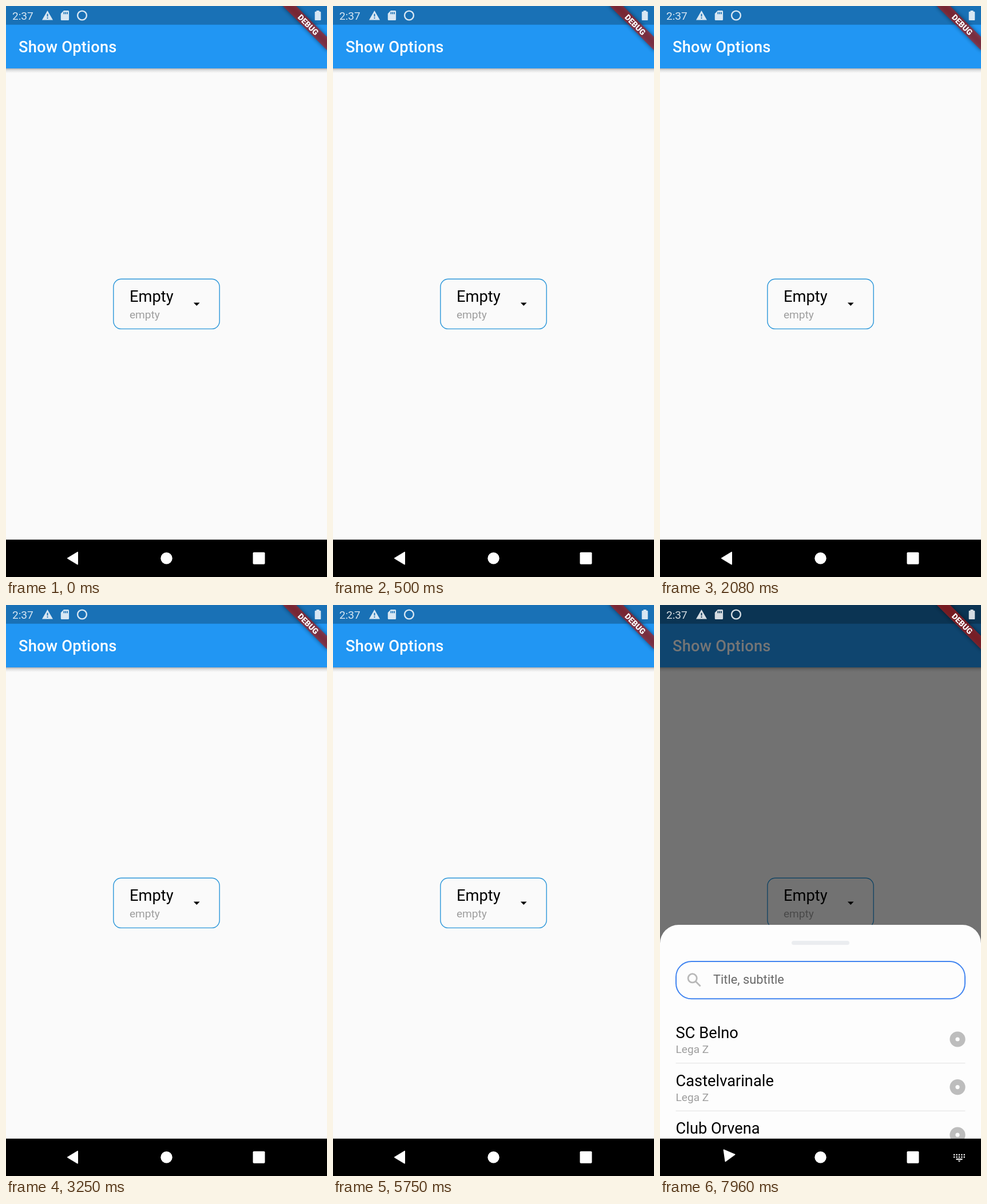
These frames come from a looping animation (561 by 998 pixels, 8 s). An HTML page:

```html
<!DOCTYPE html>
<html lang="en">
<head>
<meta charset="utf-8">
<title>Show Options</title>
<style>
  html, body { margin: 0; width: 100%; height: 100%; overflow: hidden; background: #000; }
  svg { display: block; width: 100vw; height: 100vh; font-family: Roboto, sans-serif; }
  .title { font-size: 27.28px; }
  .note { font-size: 19.1px; fill: #9e9e9e; }
</style>
</head>
<body>
<svg viewBox="0 0 561 998">
  <defs>
    <filter id="soft" x="-20%" y="-50%" width="140%" height="200%"><feGaussianBlur stdDeviation="3.5"/></filter>
    <linearGradient id="barShadow" x2="0" y2="1">
      <stop offset="0" stop-opacity=".3"/>
      <stop offset=".35" stop-opacity=".12"/>
      <stop offset="1" stop-opacity="0"/>
    </linearGradient>
  </defs>

  <!-- Page -->
  <rect width="561" height="933" fill="#fafafa"/>
  <rect y="109" width="561" height="8" fill="url(#barShadow)"/>
  <rect width="561" height="109" fill="#2196f3"/>
  <text class="title" x="22" y="81" font-weight="500" letter-spacing=".2" fill="#fff">Show Options</text>
  <rect x="187.8" y="477.2" width="185.4" height="87.2" rx="13.6" fill="none" stroke="#2b96d9" stroke-width="1.4"/>
  <text class="title" x="216" y="517">Empty</text>
  <text class="note" x="216" y="546">empty</text>
  <path d="M327.8 518.6h10.8l-5.4 5.4z"/>

  <rect id="barrier" width="561" height="933" opacity="0"/>

  <!-- Bottom sheet -->
  <g id="sheet" visibility="hidden">
    <path d="M0 933V591.5a32.5 32.5 0 0 1 32.5-32.5h496a32.5 32.5 0 0 1 32.5 32.5V933z" fill="#fdfdfd"/>
    <rect x="230" y="587" width="101" height="7" rx="3.5" fill="#ebedf0"/>
    <rect x="28" y="623" width="505" height="65.3" rx="27" fill="none" stroke="#4285f0" stroke-width="2"/>
    <g fill="none" stroke="#b8b8b8" stroke-width="2.8">
      <circle cx="56.7" cy="652.3" r="7.6"/>
      <path d="M62.2 657.8L70.6 666.2"/>
    </g>
    <text x="93" y="662" font-size="21.8" fill="#686868">Title, subtitle</text>
    <g id="rows"></g>
  </g>

  <!-- Status bar -->
  <rect width="561" height="32.7" opacity=".25"/>
  <g fill="#fff" fill-opacity=".83" fill-rule="evenodd">
    <text x="11" y="23.5" font-size="19.1">2:37</text>
    <path d="M72.5 8L82 24.5H63zM71.6 13.8h1.9v4.6h-1.9zM71.6 20h1.9v1.9h-1.9z"/>
    <path d="M101 8h7.6a1.5 1.5 0 0 1 1.5 1.5v13.9a1.5 1.5 0 0 1-1.5 1.5H97.300a1.500 1.500 0 0 1-1.500-1.500V13.300zM100.500 10.600h1.700v3.700h-1.700zM103.400 10.600h1.700v3.700h-1.700zM106.300 10.600h1.700v3.700h-1.700z"/>
    <circle cx="133" cy="16.500" r="7.900" fill="none" stroke="#fff" stroke-opacity=".83" stroke-width="2.400"/>
    <path d="M542.500 8h5v1.700h1.600a1.200 1.200 0 0 1 1.200 1.200v13a1.200 1.200 0 0 1-1.200 1.200h-8.200a1.200 1.200 0 0 1-1.200-1.200v-13a1.200 1.200 0 0 1 1.200-1.200h1.600z"/>
  </g>

  <!-- Corner ribbon -->
  <g transform="translate(561 0) rotate(45)">
    <rect x="-56" y="38.2" width="112" height="16.4" opacity=".5" filter="url(#soft)"/>
    <rect x="-56" y="38.2" width="112" height="16.4" fill="#b71c1c" fill-opacity=".627"/>
    <text y="51.300" font-size="13.9" font-weight="900" text-anchor="middle" fill="#fff">DEBUG</text>
  </g>

  <!-- Navigation bar -->
  <rect y="932.7" width="561" height="66"/>
  <g fill="#fff">
    <path id="back" d="M-10.700 0L6.700-10.500V10.500z" stroke="#fff" stroke-width="1.600" stroke-linejoin="round"/>
    <circle cx="280.5" cy="965.3" r="10.2"/>
    <rect x="431.5" y="954.8" width="21" height="21" rx="1.8"/>
    <path id="keyboard" visibility="hidden" d="M517.500 967.500h11v2.200h-11zM520.500 971h5l-2.500 2.200z"/>
    <path id="keys" visibility="hidden" fill="none" stroke="#fff" stroke-width="2.300" stroke-dasharray="2.300 2.100" d="M513 960.800h20M513 964.800h20"/>
  </g>
</svg>
<script>
  const LOOP = 8000, SHEET_START = 7590, SHEET_TIME = 250, SHEET_HEIGHT = 374;
  const BACK_START = 7850, BACK_TIME = 110;
  const el = id => document.getElementById(id);

  const clubs = ["SC Belno", "Castelvarinale", "Club Orvena"];
  el("rows").innerHTML = clubs.map((club, i) => `
    <g transform="translate(0 ${i * 83.6})">
      <text class="title" x="27.500" y="757">${club}</text>
      <text class="note" x="27.500" y="783">Lega Z</text>
      <rect x="27.500" y="800" width="506" height="1.400" fill="#e8e8e8"/>
      <circle cx="520" cy="759" r="13.600" fill="#bdbdbd"/>
      <circle cx="520" cy="759" r="3.600" fill="#fdfdfd"/>
    </g>`).join("");

  const progress = (t, start, duration) => Math.min(1, Math.max(0, (t - start) / duration));

  const bezier = (x1, y1, x2, y2) => {
    const at = (a, b, s) => 3 * a * s * (1 - s) ** 2 + 3 * b * s * s * (1 - s) + s ** 3;
    return x => {
      let low = 0, high = 1;
      for (let i = 0; i < 24; i++) {
        const mid = (low + high) / 2;
        if (at(x1, x2, mid) < x) low = mid; else high = mid;
      }
      return at(y1, y2, (low + high) / 2);
    };
  };
  const decelerate = bezier(0, 0, .2, 1);
  const ease = bezier(.25, .1, .25, 1);

  function draw(t) {
    const open = progress(t, SHEET_START, SHEET_TIME);
    el("barrier").setAttribute("opacity", open ? .54 * ease(open) : 0);
    el("sheet").setAttribute("visibility", open ? "visible" : "hidden");
    el("sheet").setAttribute("transform", `translate(0 ${SHEET_HEIGHT * (1 - decelerate(open))})`);

    const turn = progress(t, BACK_START, BACK_TIME);
    el("back").setAttribute("transform", `translate(118.500 ${965.2 - 2.7 * turn}) rotate(${-67 * turn})`);
    for (const id of ["keyboard", "keys"])
      el(id).setAttribute("visibility", turn ? "visible" : "hidden");
  }

  function tick() {
    draw(performance.now() % LOOP);
    requestAnimationFrame(tick);
  }
  tick();
</script>
</body>
</html>
```
